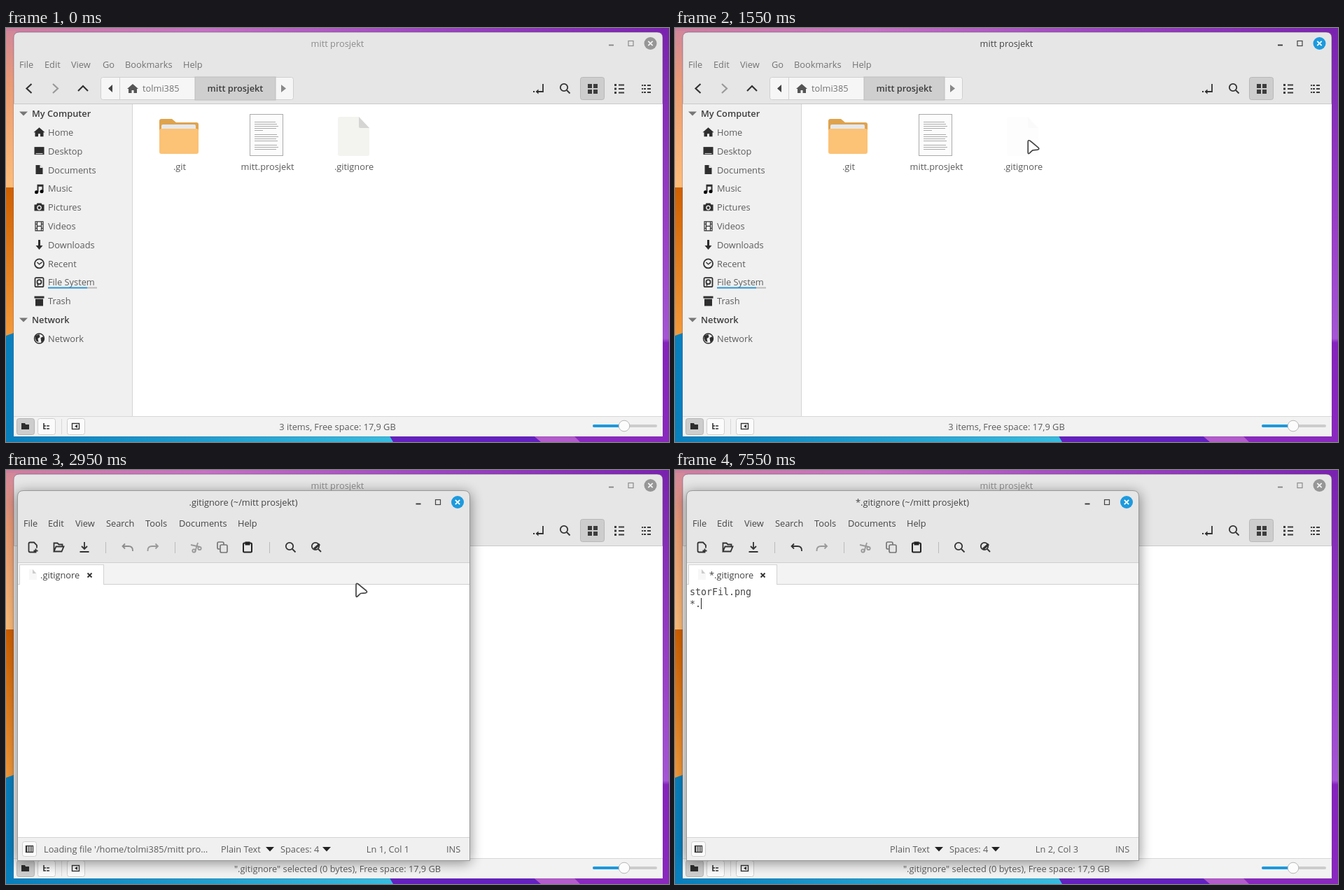
An HTML page for the animation above (8 s loop, 947 px wide and 592 px high).

```html
<!DOCTYPE html>
<html lang="en">
<head>
<meta charset="utf-8">
<title>File manager and editor</title>
<style>
html, body { margin: 0; height: 100%; overflow: hidden; }
svg { display: block; width: 100vw; height: 100vh; }
text { font: 12.8px "Open Sans", "Noto Sans", sans-serif; fill: #5c5c5c; white-space: pre; }
.bold { font-weight: 600; fill: #3c3c3c; }
.mid { text-anchor: middle; }
.menu { fill: #737373; }
.dark { fill: #444; }
.code { font: 13.3px "DejaVu Sans Mono", monospace; fill: #444; }
.line { fill: none; stroke: #333; stroke-width: 1.8; }
.pale { stroke: #999; }
.inactive { opacity: .55; }
#shade { filter: blur(9px); }
</style>
</head>
<body>
<svg id="stage" viewBox="0 0 947 592" preserveAspectRatio="none"></svg>
<script>
const USER = 'tolmi385';
const rect = (x, y, w, h, fill, extra = '') =>
  `<rect x="${x}" y="${y}" width="${w}" height="${h}" fill="${fill}" ${extra}/>`;
const text = (x, y, s, cls = '', id = '') =>
  `<text x="${x}" y="${y}" class="${cls}" id="${id}">${s}</text>`;
const shape = (d, fill = '#2e2e2e', extra = '') => `<path d="${d}" fill="${fill}" ${extra}/>`;
const line = (d, cls = '', extra = '') => `<path d="${d}" class="line ${cls}" ${extra}/>`;
const group = (id, s, extra = '') => `<g id="${id}" ${extra}>${s}</g>`;
const at = (x, y, s) => `<g transform="translate(${x} ${y})">${s}</g>`;
const ramp = (id, x2, y2, ...stops) => `<linearGradient id="${id}" x2="${x2}" y2="${y2}">` +
  stops.map(([o, c]) => `<stop offset="${o}" stop-color="${c}"/>`).join('') + '</linearGradient>';
const button = (x, y, w, h, fill = '#fbfbfb', edge = '#cfcfcf') =>
  rect(x + .5, y + .5, w - 1, h - 1, fill, `rx="3" stroke="${edge}"`);
const controls = (x, y, id) => at(x, y,
  line('M-59.5 2.5h7') + rect(-31.5, -3.5, 7, 7, 'none', 'stroke="#444" stroke-width="1.2"') +
  `<circle r="9" fill="#1c9ade" id="${id}"/>` + line('M-3.2-3.2l6.4 6.4m0-6.4l-6.4 6.4', '', 'style="stroke:#fff"'));

const wallpaper = '<defs>' +
  ramp('top', 1, 0, [0, '#cd809c'], [.3, '#c472c2'], [.65, '#9b45c0'], [1, '#7a22b0']) +
  ramp('left', 0, 1, [0, '#d28799'], [.35, '#eb9b72'], [1, '#fdbd78']) +
  ramp('amber', 0, 1, [0, '#cf6000'], [1, '#f39a3b']) +
  ramp('blue', 1, 0, [0, '#087fbd'], [1, '#36bde0']) +
  ramp('right', 0, 1, [0, '#7a22b0'], [.5, '#9a3fc8'], [.75, '#a555d6'], [.76, '#8522bd'], [1, '#8a28c0']) +
  '</defs>' + rect(0, 0, 947, 592, 'url(#top)') + rect(0, 4, 14, 224, 'url(#left)') +
  rect(0, 228, 14, 212, 'url(#amber)') + shape('M0 440l14-5V580H548l7 12H0z', 'url(#blue)') +
  rect(936, 0, 11, 592, 'url(#right)') + shape('M546 580H752l14 12H553z', '#6420c0') +
  shape('M750 580H808l14 12H764z', '#b45bcd') + shape('M808 580H947v12H820z', '#8a28c0');

const home = shape('M-8 0L0-7 8 0H6V6H1.5V2h-3V6H-6V0z');
const places = [
  ['Home', home],
  ['Desktop', rect(-7, -6, 14, 11, '#2e2e2e') + rect(-5, 3, 10, 1, '#eee')],
  ['Documents', shape('M-5-7H1L5-3V6H-5z') + shape('M1-7V-3H5', '#f0f0f0')],
  ['Music', shape('M-3-6H6V4h-2V-3H-1V5h-2z') + '<circle cx="-4" cy="5" r="2.5"/><circle cx="3.5" cy="4" r="2.5"/>'],
  ['Pictures', shape('M-7-4h3l1-2h6l1 2h3V5H-7z') + '<circle cy=".5" r="2.7" fill="none" stroke="#eee" stroke-width="1.4"/>'],
  ['Videos', line('M-5.5-6.5h11v13h-11zM-3-6V6M3-6V6M-3 0H3M-5-3h2m6 0h2M-5 3h2m6 0h2', '', 'stroke-width="1.2" style="stroke-width:1.2"')],
  ['Downloads', shape('M-1.5-7h3V1H5L0 7-5 1h3.5z')],
  ['Recent', '<circle r="6.5" class="line"/>' + line('M-3-2L0 1 4-2', '', 'style="stroke-width:1.4"')],
  ['File System', rect(-6, -6.5, 12, 13, 'none', 'rx="1.5" stroke="#2e2e2e" stroke-width="1.8"') +
    '<circle cy="-.5" r="3" class="line"/>' + line('M-2 1v4')],
  ['Trash', rect(-7, -7, 14, 3, '#2e2e2e') + shape('M-5.5-3h11V7h-11z')],
];
const globe = '<circle r="7" fill="none" stroke="#2e2e2e" stroke-width="1.4"/>' +
  shape('M-6-4L0-6 1-2-2 0-1 5-4 4-6 0zM2-1L6-3 7 2 3 6z');
const heading = (y, s) => shape(`M19 ${y - 3}h12l-6 6z`, '#777') + text(37, y + 4.5, s, 'bold');
const sidebar = rect(11, 109, 169, 446, '#f0f0f0') + rect(180, 109, 1, 446, '#d4d4d4') +
  heading(122.5, 'My Computer') + heading(417.5, 'Network') +
  places.map(([name, icon], i) => {
    const y = 149.3 + i * 26.8;
    return at(47.5, y, icon) + text(60, y + 4.7, name);
  }).join('') + at(47.5, 444, globe) + text(60, 448.5, 'Network') +
  rect(60, 370.5, 56, 2, '#2a95d5') + rect(116, 370.5, 14, 2, '#bbb');

const cells = (xs, ys, w, h) => xs.flatMap(x => ys.map(y => rect(x, y, w, h, '#3c3c3c'))).join('');
const toolbar =
  line('M36.5 80l-7 6.5 7 6.5', '', 'style="stroke-width:2.2"') +
  line('M67 80l7 6.5-7 6.5', 'pale', 'style="stroke-width:2.2"') +
  line('M103 90l7-7 7 7', '', 'style="stroke-width:2.2"') +
  button(135, 70, 276, 33, '#f6f6f6') + rect(270, 70, 115, 33, '#cfcfcf', 'stroke="#bdbdbd"') +
  rect(162, 71, 1, 31, '#d2d2d2') + shape('M152 81v11l-6-5.5z', '#444') + shape('M393 81v11l7-5.5z', '#888') +
  at(181, 87, home.replace('#2e2e2e', '#555')) + text(195, 91, USER, 'menu') + text(327.5, 91, 'mitt prosjekt', 'bold mid') +
  line('M767 80v11h-8') + shape('M756.5 91l4-3.5v7z') + rect(753, 90, 2, 2, '#333') +
  '<circle cx="797" cy="85" r="5.2" class="line"/>' + line('M801 89l4.5 4.5') +
  button(820, 70, 35, 33, '#cdcdcd', '#b8b8b8') + cells([831, 839], [80, 88], 6, 6) +
  cells([869], [80, 85.5, 91], 3, 3) + cells([875], [80.5, 86, 91.5], 8, 2) +
  cells([908, 916], [81, 86, 91], 2, 2) + cells([911, 918], [81, 86, 91], 3, 2);

const folder = shape('M219 133q0-3 3-3h15l6 5h29q3 0 3 3v20h-56z', '#dfa34d') +
  rect(222, 138, 49, 12, '#e5e8ed', 'rx="2"') +
  shape('M219 147q0-3 3-3h50q3 0 3 3v30q0 3-3 3h-50q-3 0-3-3z', '#fcc276');
let rows = '';
for (let i = 0; i < 14; i++) if (i != 5 && i != 10)
  rows += rect(355, 134 + i * 3, i == 4 ? 12 : 30 + i * 7 % 5, 1, '#aaa');
const page = rect(348.5, 123.5, 47, 59, '#fcfcfc', 'stroke="#aaa"') + rows;
const blank = shape('M477 127h27l15 16v37q0 3-3 3h-39q-3 0-3-3v-50q0-3 3-3z', '#f3f3f0') +
  shape('M504 127l15 16h-13q-2 0-2-2z', '#d5d5d3');

const manager = shape('M11 584V14q0-8 8-8H930q8 0 8 8V584z', '#e6e6e6', 'stroke="#6b4a70" stroke-opacity=".5"') +
  rect(11, 108, 927, 1, '#cacaca') + rect(181, 109, 757, 446, '#fff') +
  group('head', text(473.5, 27, 'mitt prosjekt', 'mid dark') + controls(920.5, 22, 'close')) +
  [['File', 19], ['Edit', 55], ['View', 93], ['Go', 138], ['Bookmarks', 170], ['Help', 253]]
    .map(([s, x]) => text(x, 56.5, s, 'menu')).join('') +
  toolbar + sidebar + folder + page + group('icon', blank) +
  rect(464, 187, 66, 23, '#1c98dc', 'rx="3" id="pick"') +
  text(248, 202.5, '.git', 'mid') + text(373.5, 202.5, 'mitt.prosjekt', 'mid') + text(497, 202.5, '.gitignore', 'mid', 'label') +
  rect(11, 555, 927, 29, '#f2f2f2') + rect(11, 555, 927, 1, '#d8d8d8') +
  button(15, 558, 26, 24, '#cdcdcd', '#b5b5b5') + button(45, 558, 26, 24) + button(87, 558, 26, 24) + rect(79, 559, 1, 22, '#d8d8d8') +
  shape('M22 565h5l1 2h5v7H22z') + line('M54 565v8h3m-3-4h3m1 0h4m-4 4h4', '', 'style="stroke-width:1.6"') +
  rect(94.5, 565.5, 10, 8, 'none', 'stroke="#333" stroke-width="1.4"') + shape('M102 567v5l-4-2.5z') +
  text(473.5, 574.5, '', 'mid', 'status') +
  rect(838, 567, 92, 4, '#ccc', 'rx="2"') + rect(838, 567, 45, 4, '#1c98dc', 'rx="2"') +
  '<circle cx="883" cy="569" r="7.8" fill="#fcfcfc" stroke="#b8b8b8"/>';

const tools =
  line('M42 117.5h-7.5a2 2 0 0 1-2-2v-10a2 2 0 0 1 2-2h5.500l4 4v4M42.500 112.500v6M39.500 115.500h6') +
  line('M68.500 116.500v-12h5l2 2h5v3M68.500 116.500l3-7h11l-3 7z') +
  line('M112 103v10m-4-4l4 4 4-4M105.500 117h13') +
  group('undo', line('M170 105.500l-3.500 3.500 3.500 3.500M167 109h8q6 0 6 6v1')) +
  line('M213.500 105.500l3.500 3.500-3.500 3.500M216.500 109h-8q-6 0-6 6v1', 'pale') +
  line('M264 107l13 3m-7 7l4-13', 'pale') +
  '<circle cx="268.500" cy="115.500" r="2.200" class="line pale"/><circle cx="276.500" cy="112" r="2.200" class="line pale"/>' +
  rect(302, 103, 9, 10, 'none', 'rx="2" stroke="#777" stroke-width="1.700"') +
  rect(306, 107, 10, 11, '#e6e6e6', 'rx="2" stroke="#777" stroke-width="1.700"') +
  rect(339, 104.500, 12, 13, 'none', 'rx="1.500" stroke="#222" stroke-width="2"') + rect(341.500, 102.500, 7, 5, '#222') +
  '<circle cx="405" cy="109" r="5.200" class="line"/>' + line('M409 113l4.500 4.500') +
  '<circle cx="442" cy="109" r="5.200" class="line"/>' + line('M440 113l8-7', '', 'style="stroke-width:3"') + line('M446 113l4 4') +
  [142, 241, 376].map(x => rect(x, 103, 1, 16, '#bbb')).join('');

const editor = rect(15, 32, 649, 530, '#000', 'rx="8" opacity=".42" id="shade"') +
  shape('M16.500 558.500V38q0-8.500 8.500-8.500H654q8.500 0 8.500 8.500V558.500z', '#e6e6e6', 'stroke="#999"') +
  text(339, 50.5, '', 'mid dark', 'title') + controls(645, 46, 'shut') +
  [['File', 25], ['Edit', 60], ['View', 99], ['Search', 143], ['Tools', 199], ['Documents', 247], ['Help', 331]]
    .map(([s, x]) => text(x, 80.5, s, 'dark')).join('') + tools +
  rect(17, 132, 645, 32, '#f3f3f3') + rect(17, 132, 645, 1, '#cfcfcf') + rect(17, 163, 645, 1, '#cfcfcf') +
  rect(17, 164, 645, 361, '#fff') +
  rect(19.5, 135.5, 120, 30, '#fff', 'stroke="#d3d3d3" id="tab"') + rect(17, 164, 645, 4, '#fff') +
  shape('M33 142h6l5 6v9H33z', '#f7f7f7') + shape('M38 142l5 6h-5z', '#ccc') +
  text(49, 154.700, '', 'dark', 'name') + group('cross', line('M-3-3l6 6m0-6l-6 6')) +
  text(21, 178.500, '', 'code', 'row0') + text(21, 195.500, '', 'code', 'row1') + rect(0, 0, 1, 16, '#222', 'id="caret"') +
  rect(17, 525, 645, 33, '#f0f0f0') + rect(17, 525, 645, 1, '#d3d3d3') + button(23, 531, 21, 22) +
  rect(28.500, 537.500, 10, 9, 'none', 'stroke="#333" stroke-width="1.300"') + cells([29, 32, 35], [538], 1.500, 8) +
  text(54, 546.700, `Loading file '/home/${USER}/mitt pro…`, '', 'loading') +
  text(307, 546.700, 'Plain Text') + shape('M371 539h12l-6 6.500z', '#222') +
  text(392, 546.700, 'Spaces: 4') + shape('M452 539h12l-6 6.500z', '#222') +
  text(545.500, 546.700, '', 'mid', 'pos') + text(629, 546.700, 'INS');

const arrow = shape('M0 2.500V17.500Q0 20.500 2.200 18.500L6.500 14.500 13.500 13.800Q17 13 14.500 10.500L3 1Q0-.700 0 2.500z',
  '#fff', 'stroke="#444" stroke-width="1.700" stroke-linejoin="round"');

stage.innerHTML = wallpaper + group('files', manager) + group('edit', editor) + group('mouse', arrow);
const $ = id => document.getElementById(id);
const set = (id, attr, v) => $(id).setAttribute(attr, v);
const show = (id, on) => set(id, 'visibility', on ? 'inherit' : 'hidden');

const typed = 'storFil.png\n*.';
const keys = [3500, 3700, 3850, 4000, 4300, 4500, 4700, 4950, 5450, 5550, 5900, 6450, 7150, 7550];
const ease = (t, a, b) => {
  const p = Math.min(1, Math.max(0, (t - a) / (b - a)));
  return p * p * (3 - 2 * p);
};

function draw(now) {
  const t = Math.floor(now % 8000 / 50) * 50;
  const active = t >= 150 && t < 2150, picked = t >= 1850;
  set('head', 'class', active ? '' : 'inactive');
  set('close', 'fill', active ? '#1c9ade' : '#555');

  const move = ease(t, 500, 1050), drift = ease(t, 1350, 2150);
  set('mouse', 'transform', `translate(${588 - 83 * move - 5 * drift} ${202 - 42 * move + 2 * drift})`);
  show('mouse', t >= 150 && t < keys[0]);
  set('icon', 'opacity', picked ? .85 : move > .85 ? .1 : 1);
  show('pick', picked);
  $('label').style.fill = picked ? '#fff' : '';
  $('status').textContent = (picked ? '".gitignore" selected (0 bytes)' : '3 items') + ', Free space: 17,9 GB';

  show('edit', t >= 2200);
  const opening = t < 2250;
  set('edit', 'opacity', opening ? .6 : 1);
  set('edit', 'transform', opening ? 'translate(339 294) scale(.95) translate(-339 -294)' : '');

  const count = keys.filter(k => t >= k).length;
  const rows = typed.slice(0, count).split('\n');
  const star = count ? '*' : '';
  const row = rows.length - 1, col = rows[row].length;
  $('title').textContent = star + '.gitignore (~/mitt prosjekt)';
  $('name').textContent = star + '.gitignore';
  set('tab', 'width', count ? 126 : 120);
  set('cross', 'transform', `translate(${count ? 125.5 : 119.5} 150.5)`);
  set('undo', 'opacity', count ? 1 : .5);
  $('row0').textContent = rows[0];
  $('row1').textContent = rows[1] || '';
  set('caret', 'x', 21 + col * 8);
  set('caret', 'y', 166 + row * 17);
  show('caret', t < 2950 || t >= 3350);
  show('loading', t < 5150);
  $('pos').textContent = `Ln ${row + 1}, Col ${col + 1}`;
}

const start = performance.now();
function tick() {
  draw(performance.now() - start);
  requestAnimationFrame(tick);
}
tick();
</script>
</body>
</html>
```
